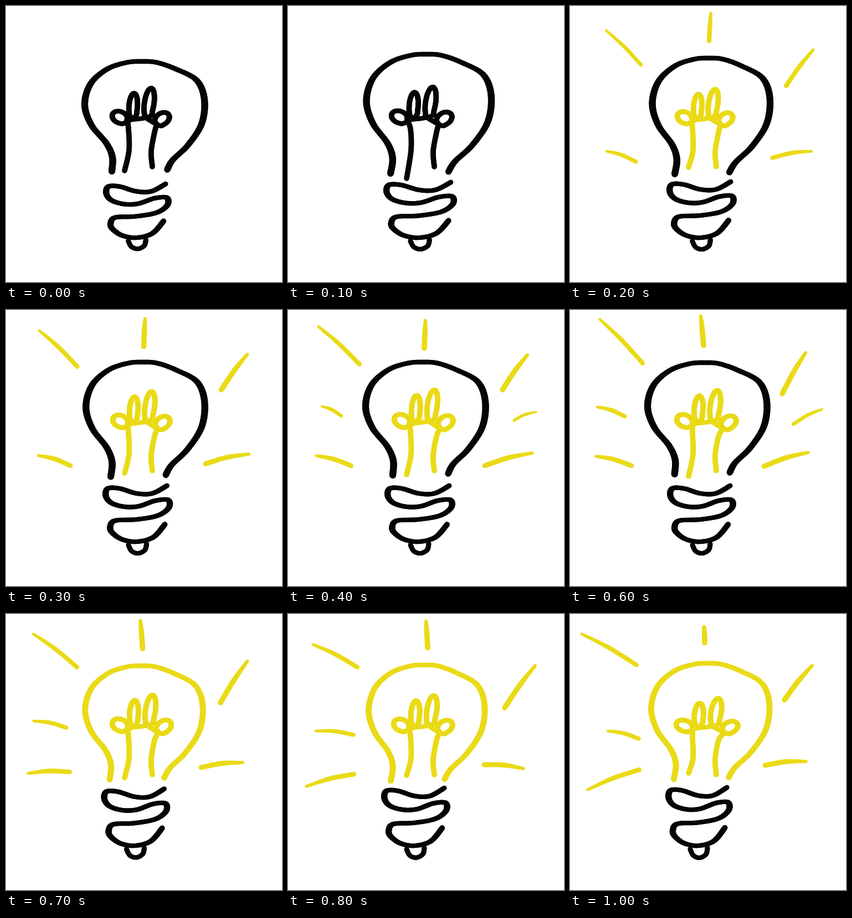
Write an HTML page with a canvas that moves like this. It is 498 px wide and 498 px high and loops after 1100 ms.

```html
<!DOCTYPE html>
<html lang="en">
<head>
<meta charset="utf-8">
<title>Light bulb</title>
<style>
  html, body { margin: 0; width: 100%; height: 100%; overflow: hidden; background: #fff; }
  canvas { display: block; width: 100vw; height: 100vh; }
</style>
</head>
<body>
<canvas id="stage" width="498" height="498"></canvas>
<script>
const ctx = document.getElementById('stage').getContext('2d');
const INK = '#050505', GLOW = '#eada17';
const STEP = 100, STEPS = 11, WIRE_ON = 2, BULB_ON = 7;

const points = text => text.split(' ').map(p => p.split(',').map(Number));

// One drawing of each part; every pose refits it to slightly different bounds.
const BULB = points('189,298 190,272 179,246 152,212 140,174 151,135 181,108 216,96 244,94 ' +
  '270,96 304,108 342,129 356,165 351,210 326,250 299,277 289,295');
const SCREW = points('291,317 264,331 236,331 205,322 184,322 180,335 190,348 214,355 240,354 ' +
  '270,344 293,343 294,357 274,371 235,378 197,380 188,391 192,402 210,414 237,418 266,410 287,387');
const NUB = points('221,424 227,435 239,439 251,433 254,422');

// Filament loops: centre, radii, tilt, start and end angle (degrees).
const LOOPS = [
  [206, 200, 15, 11, 25, 0, -325],
  [231, 179, 8, 25, 4, 50, -275],
  [261, 173, 9, 29, 8, 60, -262],
  [285, 203, 15, 11, -35, 140, -195]
];

// Tracks map a step to values; the steps between are blended.
const bulbTrack = { // left, top, right, bottom, lean of the neck
  0: [142, 100, 358, 298, 0], 1: [142, 87, 367, 302, -8], 2: [149, 94, 361, 303, -8],
  4: [140, 94, 356, 298, 0], 6: [140, 95, 355, 296, 0], 8: [146, 92, 355, 301, -8], 10: [147, 89, 360, 298, -8]
};
const wireTrack = { // left, top, right, foot of the left post
  0: [191, 148, 294, 297], 1: [186, 146, 295, 311], 2: [193, 150, 293, 291],
  4: [191, 144, 297, 297], 6: [192, 145, 299, 300], 8: [190, 147, 296, 291], 10: [191, 152, 302, 287]
};
const screwTrack = { // left, top, right
  0: [181, 321, 291], 1: [178, 318, 297], 2: [180, 317, 293],
  4: [180, 317, 294], 6: [181, 317, 292], 8: [174, 314, 285], 10: [178, 313, 286]
};

// Rays: width, then outer tip and inner end.
const rays = [
  [7.5, { 2: [65, 44, 128, 106], 4: [55, 30, 129, 98], 6: [54, 17, 131, 96], 8: [45, 55, 125, 96], 10: [21, 36, 120, 92] }],
  [9, { 2: [254, 13, 251, 63], 4: [248, 19, 246, 69], 6: [236, 11, 241, 64], 8: [249, 13, 252, 61], 10: [242, 23, 243, 52] }],
  [9, { 2: [439, 79, 390, 144], 4: [432, 81, 387, 144], 6: [425, 77, 383, 151], 8: [446, 93, 391, 169], 10: [437, 93, 387, 155] }],
  [8, { 2: [66, 262, 119, 281], 4: [51, 263, 114, 281], 6: [47, 264, 111, 281], 8: [33, 311, 119, 289], 10: [32, 317, 125, 281] }],
  [8.5, { 2: [436, 262, 365, 274], 4: [441, 258, 355, 281], 6: [430, 257, 350, 282], 8: [425, 279, 354, 272], 10: [426, 266, 352, 273] }],
  [7, { 4: [61, 174, 96, 191], 6: [49, 175, 99, 192], 8: [50, 211, 118, 218], 10: [68, 211, 124, 225] }],
  [6, { 4: [448, 184, 408, 199], 6: [455, 179, 403, 206] }]
];

const lerp = (a, b, t) => a + (b - a) * t;

function at(track, step) {
  const keys = Object.keys(track).map(Number);
  const lo = keys.filter(k => k <= step).pop(), hi = keys.find(k => k >= step);
  if (lo === undefined || hi === undefined) return null;
  const t = hi > lo ? (step - lo) / (hi - lo) : 0;
  return track[lo].map((v, i) => lerp(v, track[hi][i], t));
}

// Moves points from one box to another, boxes being [left, top, right, bottom].
const fit = (pts, [l, t, r, b], [L, T, R, B]) =>
  pts.map(([x, y]) => [lerp(L, R, (x - l) / (r - l)), lerp(T, B, (y - t) / (b - t))]);

function arc([cx, cy, rx, ry, tilt, from, to], n = 9) {
  const rad = Math.PI / 180, c = Math.cos(tilt * rad), s = Math.sin(tilt * rad);
  return Array.from({ length: n + 1 }, (_, i) => {
    const a = lerp(from, to, i / n) * rad, x = rx * Math.cos(a), y = ry * Math.sin(a);
    return [cx + x * c - y * s, cy + x * s + y * c];
  });
}

function bulbPath(step) {
  const [l, t, r, b, lean] = at(bulbTrack, step);
  return fit(BULB, [140, 94, 356, 298], [l, t, r, b])
    .map(([x, y]) => [x + lean * ((y - t) / (b - t)) ** 3, y]);
}

function wirePath(step) {
  const [l, t, r, foot] = at(wireTrack, step);
  const loops = fit(LOOPS.flatMap(o => arc(o)), [191, 144, 298, 217], [l, t, r, 217]);
  return [[214, foot], [222, 260], [221, 222], ...loops, [268, 228], [262, 262], [264, 290]];
}

// Catmull-Rom curve through the points.
function curve(pts, n = 8) {
  const out = [pts[0]];
  for (let i = 0; i < pts.length - 1; i++) {
    const b = pts[i], c = pts[i + 1], a = pts[i - 1] || b, d = pts[i + 2] || c;
    for (let s = 1; s <= n; s++) {
      const t = s / n;
      out.push([0, 1].map(k => b[k] + t / 2 * (c[k] - a[k]
        + t * (2 * a[k] - 5 * b[k] + 4 * c[k] - d[k] + t * (3 * (b[k] - c[k]) + d[k] - a[k])))));
    }
  }
  return out;
}

// width(steepness, progress) gives the pen size along the stroke.
function brush(pts, color, width) {
  const line = curve(pts);
  ctx.strokeStyle = color;
  for (let i = 1; i < line.length; i++) {
    const [x0, y0] = line[i - 1], [x1, y1] = line[i];
    const steep = Math.abs(y1 - y0) / (Math.hypot(x1 - x0, y1 - y0) || 1);
    ctx.lineWidth = width(steep * steep, i / line.length);
    ctx.beginPath();
    ctx.moveTo(x0, y0);
    ctx.lineTo(x1, y1);
    ctx.stroke();
  }
}

function drawRay([size, track], step) {
  const ray = at(track, step);
  if (!ray) return;
  const [x0, y0, x1, y1] = ray;
  const w = track[step - 1] || track[step - 2] ? size : size * 0.85;
  brush([[x0, y0], [(x0 + x1) / 2, (y0 + y1) / 2 - 3], [x1, y1]], GLOW,
    (s, t) => w * (0.6 + 0.45 * Math.min(1, t * 2)));
}

function draw(step) {
  ctx.fillStyle = '#fff';
  ctx.fillRect(0, 0, 498, 498);
  ctx.lineCap = 'round';

  const lit = step >= BULB_ON;
  brush(bulbPath(step), lit ? GLOW : INK, s => 8.3 + (lit ? 2.5 : 4) * s);
  brush(wirePath(step), step >= WIRE_ON ? GLOW : INK, s => 8.3 + 1.4 * s);

  const [l, t, r] = at(screwTrack, step);
  const place = pts => fit(pts, [180, 317, 294, 418], [l, t, r, 418]);
  brush(place(SCREW), INK, s => 8.2 + 3 * s);
  brush(place(NUB), INK, s => 8 + s);

  rays.forEach(ray => drawRay(ray, step));
}

function tick(now) {
  draw(Math.floor(now / STEP) % STEPS);
  requestAnimationFrame(tick);
}

draw(0);
requestAnimationFrame(tick);
</script>
</body>
</html>
```
